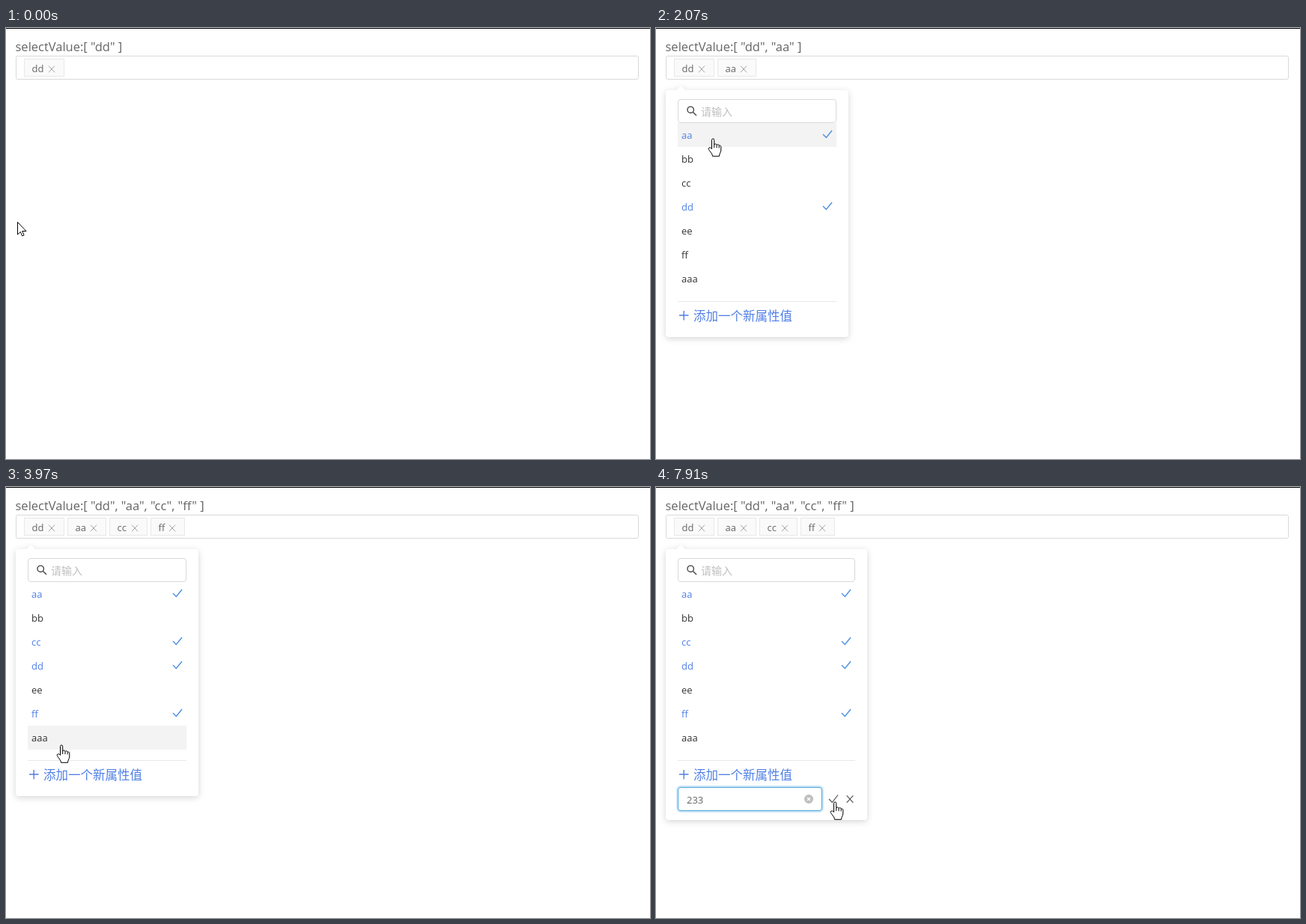
An HTML page for the animation above (7990 ms loop, 860x576 px).

```html
<!DOCTYPE html>
<html lang="zh">
<head>
<meta charset="utf-8">
<title>Tag select</title>
<style>
html, body { margin: 0; width: 100%; height: 100%; overflow: hidden; background: #fff; }
svg { display: block; width: 860px; height: 576px; }
text { font: 13px "Open Sans", "Noto Sans CJK SC", "Noto Sans CJK", "Noto Sans", sans-serif; fill: #333; white-space: pre; }
path, line { fill: none; }
.title { font-size: 16.5px; fill: #666; }
.box { fill: #fff; stroke: #d9d9d9; }
.tag rect { fill: #fafafa; stroke: #e8e8e8; }
.tag text, .typed { fill: #666; }
.tag path { stroke: #a3a3a3; }
.hint { font-size: 14px; fill: #bfbfbf; }
.on text, .link text { fill: #4f7fe6; }
.link text { font-size: 16.5px; }
.link path { stroke: #4f7fe6; stroke-width: 1.4; }
.tick { stroke: #4a90e2; stroke-width: 1.4; }
.dark { stroke: #555; stroke-width: 1.2; }
.card { fill: #fff; filter: drop-shadow(0 2px 4px rgba(0,0,0,.17)); }
.cursor path { fill: #fff; stroke: #000; stroke-linejoin: round; }
</style>
</head>
<body>
<svg id="stage" viewBox="0 0 860 576">
  <rect width="860" height="576" fill="#fff"/>
  <rect width="860" height="1" fill="#000"/>
  <text id="title" class="title" x="12.5" y="31"></text>
  <rect class="box" x="13.5" y="37.5" width="831" height="31" rx="2"/>
  <g id="tags"></g>

  <g id="panel">
    <path id="card" class="card"/>
    <rect id="search" class="box" x="29.5" y="95.5" height="31" rx="3.5"/>
    <g stroke="#444" stroke-width="1.4" fill="none">
      <circle cx="46.2" cy="109.3" r="4.2"/>
      <path d="M49.4 112.4L54 117"/>
    </g>
    <text class="hint" x="60" y="117">请输入</text>
    <rect id="hover" x="29" height="32" fill="#f3f3f3"/>
    <g id="rows"></g>
    <line id="rule" x1="29" y1="365.5" y2="365.5" stroke="#e8e8e8"/>
    <g class="link">
      <path d="M31 384H43.5M37.2 378V390.5"/>
      <text x="50" y="390.5">添加一个新属性值</text>
    </g>
    <g id="adder">
      <rect id="glow" x="28.5" y="400.5" width="194" height="33" rx="4.5" fill="none" stroke="#cfe6f8" stroke-width="3"/>
      <rect id="field" class="box" x="29.5" y="401.5" width="192" height="31" rx="3.5"/>
      <text id="hint" class="hint" x="41" y="423">添加一个新项</text>
      <text id="typed" class="typed" x="41" y="423"></text>
      <rect id="caret" y="408" width="1" height="19" fill="#333"/>
      <g id="clear">
        <circle cx="204" cy="417" r="6" fill="#bfbfbf"/>
        <path d="M202 415l4 4m0-4l-4 4" stroke="#fff" stroke-width="1.2"/>
      </g>
      <path class="dark" d="M231 417l4.3 4.5L243 411.5"/>
      <path class="dark" d="M254.7 412.3l8.6 9.6m0-9.6l-8.6 9.6"/>
    </g>
  </g>

  <g id="cursor" class="cursor">
    <path id="arrow" d="M.5 .5V17l3.8-3.6 2.4 5.5 2.4-1-2.4-5.4h5.3z"/>
    <g id="hand">
      <path d="M-1.5 13.5V1.6a1.6 1.6 0 0 1 3.2 0V8a1.7 1.7 0 0 1 3.3 .6a1.7 1.7 0 0 1 3.2 .8a1.6 1.6 0 0 1 2.6 1V15C10.8 18.5 8.5 19.5 8.5 23.3H-.5C-.5 20-3.5 18-5.5 14.5a1.7 1.7 0 0 1 .4-2.4c1.2-.7 2.6-.1 3.6 1.4z"/>
      <path d="M1.7 8v4M5 8.8v3.4M8.2 9.6v2.8"/>
    </g>
    <path id="beam" d="M-2.5-7.5h6M.5-7.5v15M-2.5 7.5h6"/>
  </g>
</svg>
<script>
const LOOP = 7990, OPEN = 1010, EXPAND = 4500, FOCUS = 5110, BLINK = 530;
const names = ['aa', 'bb', 'cc', 'dd', 'ee', 'ff', 'aaa'];
// label, time picked, left edge, width
const picks = [['dd', -1000, 24, 54], ['aa', 1870, 82, 52], ['cc', 2720, 138, 51], ['ff', 3700, 193, 46]];
const keys = [[6650, '2'], [6930, '23'], [7140, '233']];
// time, x, y of the pointer's hot spot
const path = [
  [40, 15, 259], [650, 120, 58], [1350, 120, 58], [1540, 76, 141], [1980, 76, 141],
  [2430, 74, 204], [2800, 74, 204], [3360, 54, 313], [3410, 54, 302], [3760, 54, 302],
  [3970, 74, 345], [4300, 84, 386], [4740, 84, 386], [4860, 94, 425], [5060, 94, 428],
  [5470, 94, 427], [7380, 94, 427], [7900, 239, 421]
];

const el = id => document.getElementById(id);
const set = (node, attrs) => { for (const k in attrs) node.setAttribute(k, attrs[k]); };
const show = (node, on) => set(node, { visibility: on ? 'inherit' : 'hidden' });
const clamp = v => Math.min(1, Math.max(0, v));
const easeOut = v => 1 - (1 - clamp(v)) ** 3;
const smooth = v => v * v * (3 - 2 * v);
const inside = (p, x, y, r, b) => p.x >= x && p.x < r && p.y >= y && p.y < b;

el('tags').innerHTML = picks.map(([label, , x, w]) => {
  const c = x + w - 17;
  return `<g class="tag"><rect x="${x + .5}" y="41.5" width="${w - 1}" height="23"/>
    <text x="${x + 10.5}" y="59">${label}</text>
    <path d="M${c - 4} 50.7l8 8.6m0-8.6l-8 8.6"/></g>`;
}).join('');
el('rows').innerHTML = names.map((label, i) =>
  `<g><text x="34" y="${148 + i * 32}">${label}</text>
    <path class="tick" d="M223 ${142 + i * 32}l4.3 4.5L235 ${137 + i * 32}"/></g>`).join('');
const tags = [...el('tags').children], rows = [...el('rows').children];

function pointer(t) {
  const i = path.findIndex(k => k[0] > t);
  if (i < 1) {
    const [, x, y] = path[i ? path.length - 1 : 0];
    return { x, y };
  }
  const [t0, x0, y0] = path[i - 1], [t1, x1, y1] = path[i];
  const k = smooth((t - t0) / (t1 - t0));
  return { x: Math.round(x0 + (x1 - x0) * k), y: Math.round(y0 + (y1 - y0) * k) };
}

function shape(p, open, wide, right, typed) {
  if (inside(p, 13, 37, 845, 69)) return 'hand';
  if (!open) return 'arrow';
  if (inside(p, 29, 127, right, 351) || inside(p, 29, 372, 182, 398)) return 'hand';
  if (inside(p, 29, 95, right, 127)) return 'beam';
  if (!wide) return 'arrow';
  if (inside(p, 230, 408, 266, 426) || typed && inside(p, 198, 411, 210, 429)) return 'hand';
  return inside(p, 29, 401, 222, 433) ? 'beam' : 'arrow';
}

function drawPanel(t, p, wide, right, typed) {
  const k = easeOut((t - OPEN) / 240), s = .8 + .2 * k;
  const edge = right + 16, base = wide ? 445 : 413;
  show(el('panel'), t >= OPEN);
  set(el('panel'), { opacity: k, transform: `translate(33 77) scale(${s}) translate(-33 -77)` });
  set(el('card'), { d: `M17 83H27L33 77 39 83H${edge - 4}q4 0 4 4V${base - 4}q0 4-4 4H17q-4 0-4-4V87q0-4 4-4z` });
  set(el('search'), { width: right - 30 });
  set(el('rule'), { x2: right });

  const row = Math.floor((p.y - 127) / 32);
  show(el('hover'), t >= OPEN && inside(p, 29, 127, right, 351));
  set(el('hover'), { y: 127 + row * 32, width: right - 29 });
  rows.forEach((g, i) => {
    const on = picks.some(([label, at]) => label === names[i] && t >= at);
    set(g, { class: on ? 'on' : '' });
    show(g.lastChild, on);
    set(g.lastChild, { transform: `translate(${right - 241})` });
  });

  const focused = t >= FOCUS, hovered = inside(p, 29, 401, 222, 433);
  const last = keys.reduce((at, key) => t >= key[0] ? key[0] : at, FOCUS);
  show(el('adder'), wide);
  show(el('glow'), wide && focused);
  set(el('glow'), { opacity: clamp((t - FOCUS) / 250) });
  el('field').style.stroke = focused ? '#49a6dc' : hovered ? '#a3c4e4' : '#d9d9d9';
  show(el('hint'), wide && !typed);
  show(el('clear'), wide && typed);
  el('typed').textContent = typed;
  show(el('caret'), focused && Math.floor((t - last) / BLINK) % 2 === 0);
  set(el('caret'), { x: 41 + Math.round(typed.length * 7.44) });
}

function draw(t) {
  const p = pointer(t), wide = t >= EXPAND, right = wide ? 266 : 241;
  const typed = keys.reduce((text, key) => t >= key[0] ? key[1] : text, '');
  const chosen = picks.filter(pick => t >= pick[1]).map(pick => `"${pick[0]}"`);
  el('title').textContent = `selectValue:[ ${chosen.join(', ')} ]`;
  tags.forEach((g, i) => set(g, { opacity: easeOut((t - picks[i][1]) / 200) }));
  drawPanel(t, p, wide, right, typed);

  const kind = shape(p, t >= OPEN, wide, right, typed);
  for (const id of ['arrow', 'hand', 'beam']) show(el(id), id === kind);
  set(el('cursor'), { transform: `translate(${p.x} ${p.y})` });
}

const start = performance.now();
function tick() {
  draw((performance.now() - start) % LOOP);
  requestAnimationFrame(tick);
}
tick();
</script>
</body>
</html>
```
